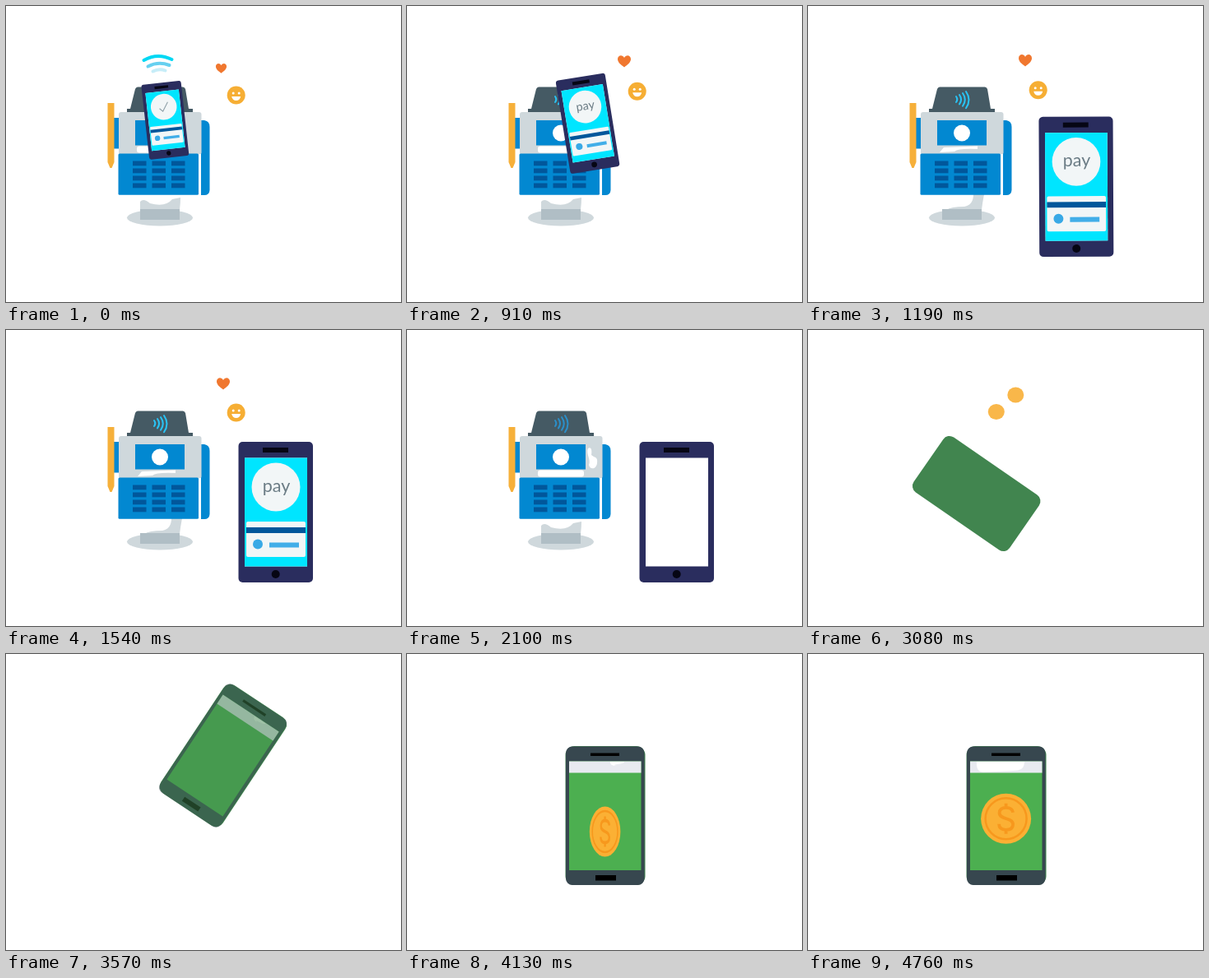
Recreate the animation shown at these times as an HTML page. Size 480 px wide and 360 px high, loop 5.11 s.

```html
<!DOCTYPE html>
<html lang="en">
<head>
<meta charset="utf-8">
<title>Mobile payment</title>
<style>
html, body { margin: 0; width: 100%; height: 100%; overflow: hidden; background: #fff; }
svg { display: block; width: 480px; height: 360px; }
text { font-family: Lato, "Open Sans", sans-serif; }
</style>
</head>
<body>
<svg viewBox="0 0 480 360">
  <g id="shop">
    <ellipse cx="187" cy="257.5" rx="40" ry="10" fill="#cfd8dc"/>
    <path id="neckWorn" fill="#cfd8dc" d="M163 248V238Q167 233 175 240Q194 245 202 235Q207 234 212 233Q212 240 211 248Z"/>
    <path id="neckFull" fill="#cfd8dc" d="M168 248Q174 244 190 244Q201 242 201 229H214Q212 239 211 248Z"/>
    <rect x="163" y="247" width="48" height="13" fill="#b0bec5"/>
    <path fill="#455a64" d="M147 129V125H151L157 101Q158 98.500 160 98.500H215Q217 98.500 218 101L222 125H227V129Z"/>
    <g id="hatWaves" fill="none" stroke-width="2" stroke-linecap="round"></g>
    <rect x="131" y="136" width="7" height="37.500" fill="#0288d1"/>
    <path fill="#f6b03a" d="M123.500 118H131.500V190L128.500 197H126.500L123.500 190Z"/>
    <path fill="#0288d1" d="M237 139H241Q247.500 140 247.500 147V224Q247 230 241 230H237Z"/>
    <rect x="137" y="129" width="100.500" height="52" rx="3" fill="#cfd8dc"/>
    <rect x="234" y="180" width="3" height="50" fill="#fff"/>
    <rect x="136.500" y="179.500" width="97.500" height="50.200" rx="1.500" fill="#0288d1"/>
    <rect x="157" y="139" width="60" height="30.500" fill="#0288d1"/>
    <circle cx="187" cy="154.500" r="10" fill="#fff"/>
    <rect id="slot" x="159" y="170.500" width="56" height="8" rx="3" fill="#fff"/>
    <path id="slotPart" fill="#fff" d="M160 178L165 172L206 170.500V174Q182 173 178 177Z"/>
    <path id="chip" fill="#fff" d="M220 144c4-3 5 3 4 8c5 4 8 2 7 10c-1 8-9 8-10 2c3-6-4-14-1-20Z"/>
    <g id="keys" fill="#01579b"></g>
    <g id="signal" fill="none" stroke-width="4" stroke-linecap="round">
      <path stroke="#00d8f4" d="M167.500 66Q184 56.500 201.500 65"/>
      <path stroke="#66d0f0" d="M172.500 73.500Q185 67 198.500 72"/>
      <path stroke="#c6edf8" d="M178.500 79.500Q186 75.500 193.500 78.500"/>
    </g>
    <path id="heart" fill="#f0772f" d="M0 7C-4 4-8 1-8-3C-8-8-2-9 0-4.500C2-9 8-8 8-3C8 1 4 4 0 7Z"/>
    <g id="smile">
      <circle r="11" fill="#f6ae34"/>
      <path fill="#fff" d="M-5.500 1.500H5.500Q4.500 6.500 0 6.500T-5.500 1.500Z"/>
      <circle cx="-3.500" cy="-2.500" r="1.500" fill="#fff"/>
      <circle cx="3.500" cy="-2.500" r="1.500" fill="#fff"/>
    </g>
    <g id="payPhone"><g transform="translate(-328 -221.500)">
      <rect x="282.500" y="136" width="90.500" height="171" rx="5" fill="#2a2d5e"/>
      <rect x="312" y="143" width="31" height="6" fill="#060614"/>
      <circle cx="327.700" cy="297" r="5" fill="#060614"/>
      <rect x="290" y="155.500" width="76" height="132" fill="#fff"/>
      <g id="payScreen">
        <rect x="290" y="155.500" width="76" height="132" fill="#00e5ff"/>
        <circle cx="328" cy="191" r="29.500" fill="#f2f6f7"/>
        <text id="pay" x="328.500" y="196.500" font-size="21.500" text-anchor="middle" fill="#6b7c85">pay</text>
        <path id="check" d="M318 194l7 7 13-20" fill="none" stroke="#8fa0a8" stroke-width="2"/>
        <rect x="292" y="233" width="72" height="43" rx="2" fill="#f2f6f7"/>
        <rect x="292" y="240" width="72" height="7" fill="#01579b"/>
        <circle cx="306" cy="260.500" r="6" fill="#38a9e6"/>
        <rect x="320" y="258.500" width="36" height="6" fill="#42aee8"/>
      </g>
    </g></g>
  </g>
  <g id="cash">
    <ellipse id="coinA" rx="10" ry="9.500" fill="#f9b74a"/>
    <ellipse id="coinB" rx="10" ry="9.500" fill="#f9b74a"/>
    <g id="wallet">
      <rect x="-48.500" y="-84.500" width="97" height="169" rx="11" fill="#41854f"/>
      <g id="front"><g transform="translate(-241 -196.500)">
        <rect x="193" y="112.500" width="95.500" height="168.500" rx="8" fill="#37474f"/>
        <rect x="223" y="120.500" width="35" height="3.500" fill="#000"/>
        <rect x="229" y="269" width="25" height="6.500" fill="#000"/>
        <rect x="197" y="130.500" width="87.500" height="132.500" fill="#4caf50"/>
        <rect x="197" y="130.500" width="87.500" height="14" fill="#e8eaf0"/>
        <path id="shine" fill="#fff"/>
      </g></g>
    </g>
    <g id="dollar">
      <circle r="30.500" fill="#fbb034"/>
      <circle r="25" fill="none" stroke="#f7981d" stroke-width="2.500"/>
      <path fill="none" stroke="#f7981d" stroke-width="3.800" d="M8.500-7.500C8-12 4-13.500 0-13.500C-5-13.500-8-11-8-7C-8 2 8.500-2 8.500 7C8.500 11.500 5 13.500 0 13.500C-5 13.500-8.500 11.500-8.500 6.500M0-18.500V-13M0 13V18.500"/>
    </g>
  </g>
</svg>
<script>
const LOOP = 5110, STEP = 70, SCENE = 2660, REST = 4760;
const el = {};
document.querySelectorAll('[id]').forEach(e => el[e.id] = e);

function add(parent, tag, attrs) {
  const e = document.createElementNS('http://www.w3.org/2000/svg', tag);
  for (const k in attrs) e.setAttribute(k, attrs[k]);
  parent.append(e);
}
for (let i = 0; i < 12; i++)
  add(el.keys, 'rect', { x: 154 + i % 3 * 23.5, y: 188.5 + Math.floor(i / 3) * 9, width: 16.5, height: 5.8 });
for (let i = 0; i < 4; i++)
  add(el.hatWaves, 'path', { d: `M${180 + 4 * i} ${110 - 2 * i}q${2.5 + 1.5 * i} ${3.5 + 2.2 * i} 0 ${7 + 4.4 * i}` });

const mix = (a, b, p) => a + (b - a) * p;
const ramp = (t, a, b) => Math.min(1, Math.max(0, (t - a) / (b - a)));
const easeInOut = u => u < .5 ? 8 * u ** 4 : 1 - 8 * (1 - u) ** 4;
const show = (e, on) => e.setAttribute('opacity', Number(on));
const place = (e, x, y, sx = 1, turn = 0, sy = sx) =>
  e.setAttribute('transform', `translate(${x} ${y}) rotate(${turn}) scale(${sx} ${sy})`);

function drawShop(t) {
  // the phone swings off the terminal along a bowed path
  const p = easeInOut(ramp(t, 600, 1330)), bow = Math.sin(Math.PI * p);
  place(el.payPhone, mix(193.5, 328, p) - 12 * bow, mix(138.8, 221.5, p) - 24 * bow,
    mix(.535, 1, p) + .02 * bow, mix(-6.3, 0, p) - 6.2 * bow);
  place(el.heart, mix(261.5, 264, ramp(t, 0, 560)), 76 - 12 * (1 - Math.exp(-t / 750)), mix(.82, 1, ramp(t, 0, 560)));
  place(el.smile, 279.7, 108.5 - .0052 * t);

  const fade = 1 - ramp(t, 1750, 2030);
  for (const e of [el.heart, el.smile, el.payScreen]) show(e, fade);
  show(el.signal, 1 - ramp(t, 140, 490));
  show(el.check, t < 420);
  show(el.pay, t >= 420);

  const faded = t >= 1820, clear = t >= 1190 && !faded;
  el.hatWaves.setAttribute('stroke', faded ? '#2b8fc9' : '#29c4f6');
  for (const e of [el.neckFull, el.slotPart]) show(e, clear);
  for (const e of [el.neckWorn, el.slot]) show(e, !clear);
  show(el.chip, faded);
}

function toss(e, t, x, lag) {
  place(e, x + .17 * (t - 3080), 46 + 33 * ((t - lag - 3300) / 220) ** 2);
  show(e, t >= 2800 && t < 3500);
}

function drawCash(t) {
  toss(el.coinA, t, 252.3, 0);
  toss(el.coinB, t, 228.8, 60);

  // the card spins, hops and lands upright as a phone
  const turn = 229 * (1 - ramp(t, SCENE, 3920)) ** 1.5;
  const p = ramp(t, 3080, 3920), hop = Math.max(0, Math.sin(Math.PI * p)) ** 1.5;
  place(el.wallet, mix(204.7, 241, p) + 40 * hop, mix(199, 196.5, p) - 78 * hop, mix(.838, 1, p), turn);
  show(el.front, ramp(t, 3430, 3710));

  const left = (REST - t) / 630, size = ramp(t, 3850, 4060);
  const face = Math.max(.06, Math.abs(Math.cos(232 * left * Math.PI / 180)));
  place(el.dollar, 240.6, 200.3 + 15.7 * left, size * face, 0, size);
  show(el.dollar, size > 0);

  const s = ramp(t, 4130, REST), a = 247 - 42 * s, b = 264 - s, d = 136 + 7.5 * s;
  el.shine.setAttribute('d', `M${a} 131H${b}Q${b} ${d - 3} ${b - 8} ${d - 2}T${a + 8} ${d}Q${a - 1} ${d} ${a} 131Z`);
}

function draw() {
  const t = Math.floor(performance.now() % LOOP / STEP) * STEP;
  const shop = t < SCENE;
  el.shop.style.display = shop ? '' : 'none';
  el.cash.style.display = shop ? 'none' : '';
  if (shop) drawShop(t); else drawCash(Math.min(t, REST));
  requestAnimationFrame(draw);
}
draw();
</script>
</body>
</html>
```
